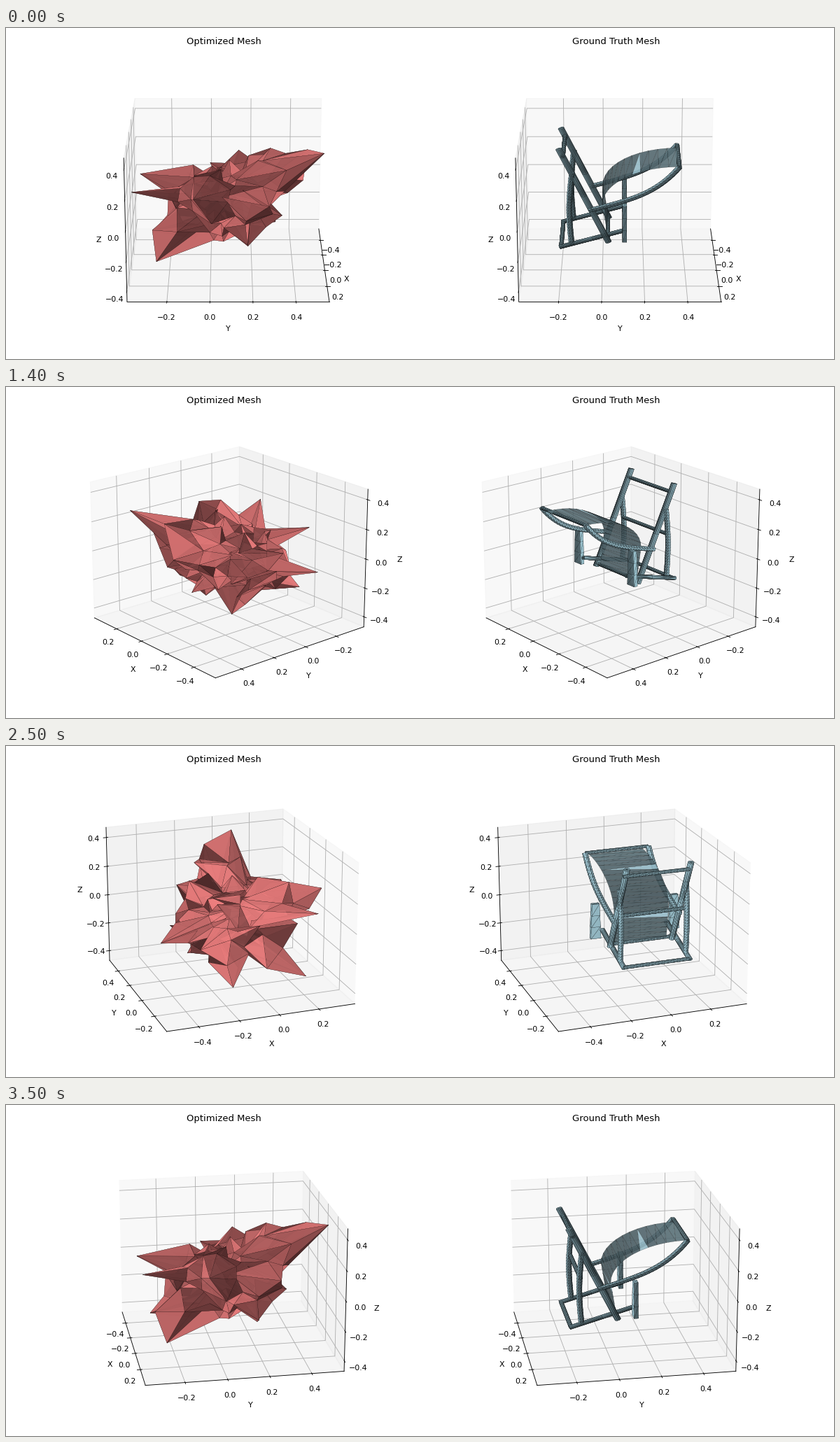
These frames come from a looping animation (1183 by 473 pixels, 3600 ms). A matplotlib script:

```python
import itertools

import matplotlib.pyplot as plt
import numpy as np
from matplotlib.animation import FuncAnimation
from mpl_toolkits.mplot3d.art3d import Poly3DCollection

WIDTH, HEIGHT, DPI = 1183, 473, 78.75
FRAMES, INTERVAL = 36, 100
CENTER = np.array([-0.085, 0.085, 0.0])
HALF = 0.47
rng = np.random.default_rng(4)

# The longest spikes, relative to CENTER; all others follow from noise.
KEY_SPIKES = np.array([
    (.28, -.45, .16), (.18, .45, .37), (-.41, -.21, -.03), (-.17, .12, -.30),
    (-.11, -.37, -.30), (.27, -.34, -.31), (.42, -.16, .18), (.01, .38, .32),
    (.35, .19, .10), (-.11, -.43, .10), (-.16, .31, .09), (.32, .09, -.17),
])


def unit(v):
    return v / np.linalg.norm(v, axis=-1, keepdims=True)


def icosphere(levels):
    phi = (1 + 5 ** 0.5) / 2
    points = []
    for a, b in itertools.product((-1, 1), (-phi, phi)):
        points += [(0, a, b), (a, b, 0), (b, 0, a)]
    verts = list(unit(np.array(points)))
    faces = []
    for tri in itertools.combinations(range(12), 3):
        a, b, c = (verts[k] for k in tri)
        if max(np.linalg.norm(p - q) for p, q in ((a, b), (b, c), (a, c))) < 1.1:
            outward = np.dot(np.cross(b - a, c - a), a) > 0
            faces.append(tri if outward else tri[::-1])
    for _ in range(levels):
        middle, split = {}, []

        def mid(i, j):
            key = (min(i, j), max(i, j))
            if key not in middle:
                middle[key] = len(verts)
                verts.append(unit(verts[i] + verts[j]))
            return middle[key]

        for a, b, c in faces:
            ab, bc, ca = mid(a, b), mid(b, c), mid(c, a)
            split += [(a, ab, ca), (b, bc, ab), (c, ca, bc), (ab, bc, ca)]
        faces = split
    return np.array(verts), np.array(faces)


def spiky_mesh(core=0.23):
    """Sphere drawn out into wide cones around the key spikes, then crumpled."""
    dirs, faces = icosphere(2)
    lengths = np.linalg.norm(KEY_SPIKES, axis=1)
    angles = np.arccos(np.clip(dirs @ unit(KEY_SPIKES).T, -1, 1))
    stretch = (lengths - core) * np.exp(-(angles / 0.36) ** 2)
    radius = core + stretch.max(axis=1)
    verts = dirs * (radius * rng.uniform(0.45, 1.12, len(dirs)))[:, None]
    verts += rng.normal(0, 0.035, verts.shape)
    verts[angles.argmin(axis=0)] = KEY_SPIKES
    folded = rng.random(len(faces)) < 0.3
    faces[folded] = faces[folded, ::-1]
    return (verts + CENTER)[faces]


def tube(path, r_side, r_normal, sides):
    """Capped tube along a path that runs along x or in a y-z plane."""
    path = np.asarray(path, float)
    r_side = np.broadcast_to(r_side, len(path))[:, None, None]
    tangent = unit(np.gradient(path, axis=0))
    along_x = abs(tangent[0, 0]) > 0.9
    side = np.array([0, 1, 0] if along_x else [1, 0, 0])
    normal = np.cross(tangent, side)[:, None]
    angle = (2 * np.pi * (np.arange(sides) + 0.5) / sides)[None, :, None]
    rings = (path[:, None] + r_side * np.cos(angle) * side
             + r_normal * np.sin(angle) * normal)
    tris = []
    for low, high in zip(rings, rings[1:]):
        for k in range(sides):
            n = (k + 1) % sides
            tris += [(low[k], low[n], high[n]), (low[k], high[n], high[k])]
    for k in range(sides):
        n = (k + 1) % sides
        tris += [(path[0], rings[0][n], rings[0][k]),
                 (path[-1], rings[-1][k], rings[-1][n])]
    return tris


def bar(start, end, radius, sides=10, steps=3):
    return tube(np.linspace(start, end, steps), radius, radius, sides)


def fabric():
    theta = np.linspace(0, np.pi / 2, 13)
    arc = np.column_stack([0.36 - 0.358 * np.sin(theta),
                           0.05 + 0.25 * np.cos(theta)])
    drop = np.linspace(arc[-1], (0.028, -0.165), 7)[1:]
    curve = np.vstack([arc, drop])
    left, right = (np.insert(curve, 0, x, axis=1) for x in (-0.145, 0.135))
    tris = []
    for k in range(len(curve) - 1):
        upper = (left[k], right[k], right[k + 1])
        lower = (left[k], right[k + 1], left[k + 1])
        tris += [upper[::-1] if k % 9 == 4 else upper, lower]
    return tris


def chair_side(sign):
    post_x, rail_x, leg_x = 0.005 + 0.16 * sign, 0.167 * sign, 0.204 * sign
    s = np.linspace(0, 1, 26)
    fixed = np.full_like(s, rail_x)
    strut = np.column_stack([fixed, -0.138 - 0.005 * s - 0.012 * np.sin(np.pi * s),
                             0.275 - 0.475 * s])
    arm = np.column_stack([fixed, -0.06 + 0.422 * s,
                           0.026 + 0.152 * s + 0.135 * s ** 4])
    leg = np.linspace((leg_x, 0.107, 0.08), (leg_x, 0.107, -0.155), 4)
    return (bar((post_x, -0.199, 0.43), (post_x, 0.031, -0.187), 0.0145)
            + bar((rail_x, -0.2, -0.22), (rail_x, 0.112, -0.105), 0.012)
            + tube(strut, 0.013, 0.013, 6)
            + tube(arm, 0.014, 0.014, 6)
            + tube(leg, np.linspace(0.026, 0.036, 4), 0.014, 4))


def deck_chair():
    tris = fabric() + chair_side(-1) + chair_side(1)
    crossbars = [(-0.18, 0.378), (-0.146, 0.105), (-0.193, -0.218),
                 (0.027, -0.168), (0.362, 0.313)]
    for y, z in crossbars:
        tris += bar((-0.165, y, z), (0.165, y, z), 0.01, 8, 22)
    return np.array(tris)


def add_view(center_x, title, triangles, color):
    size, bottom = 430.9, 11.7
    ax = fig.add_axes([(center_x - size / 2) / WIDTH, bottom / HEIGHT,
                       size / WIDTH, size / HEIGHT], projection='3d')
    ax.add_collection3d(Poly3DCollection(
        triangles, facecolors=color, edgecolors='k', linewidths=0.15,
        alpha=0.9, shade=True))
    ax.set(xlim=(CENTER[0] - HALF, CENTER[0] + HALF),
           ylim=(CENTER[1] - HALF, CENTER[1] + HALF),
           zlim=(-HALF, HALF), xlabel='X', ylabel='Y', zlabel='Z')
    for axis in (ax.xaxis, ax.yaxis, ax.zaxis):
        axis.set_major_locator(plt.MultipleLocator(0.2))
    ax.set_title(title, pad=7)
    return ax


fig = plt.figure(figsize=(WIDTH / DPI, HEIGHT / DPI), dpi=DPI)
views = [
    add_view(311.65, 'Optimized Mesh', spiky_mesh(), 'lightcoral'),
    add_view(871.35, 'Ground Truth Mesh', deck_chair(), 'lightblue'),
]


def update(frame):
    for ax in views:
        ax.view_init(elev=20, azim=360 * frame / FRAMES)
    return views


anim = FuncAnimation(fig, update, frames=FRAMES, interval=INTERVAL,
                     repeat=True, blit=False)
plt.show()
```
